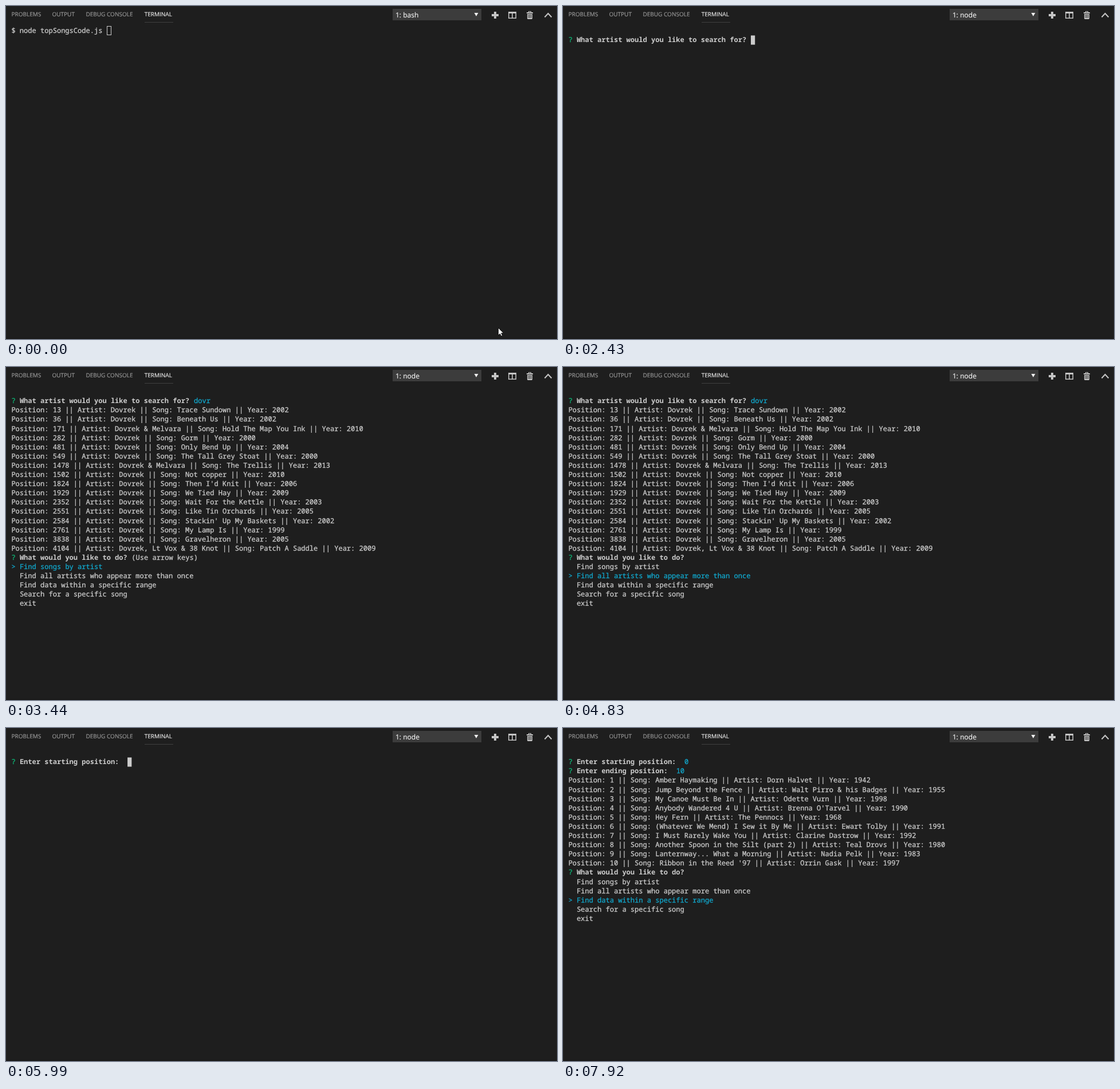
Write an HTML page that moves like this. It is 962x582 px and loops after 8 s.

```html
<!DOCTYPE html>
<html lang="en">
<head>
<meta charset="utf-8">
<title>Terminal</title>
<style>
  html, body { margin: 0; width: 100%; height: 100%; overflow: hidden; background: #1e1e1e; }
  svg { display: block; width: 962px; height: 582px; }
  text {
    text-rendering: geometricPrecision; white-space: pre;
    fill: currentColor; stroke: currentColor; stroke-width: .2px;
  }
  .ui { font-family: "Open Sans", "Noto Sans", sans-serif; }
  .tab { font-size: 10px; color: #979797; }
  .active { color: #e7e7e7; }
  .shell { font-size: 12px; color: #f0f0f0; }
  #screen { font: 12.067px "Noto Sans Mono", "DejaVu Sans Mono", monospace; color: #ccc; }
  #screen text { stroke-width: .3px; }
  #screen .bold { font-weight: 700; stroke: none; }
  #screen .cyan { color: #11a8cd; }
  #screen .green { color: #0dbc79; }
  .block { fill: #ccc; }
  .outline { fill: none; stroke: #ccc; }
</style>
</head>
<body>
<svg viewBox="0 0 962 582">
  <rect width="962" height="582" fill="#1e1e1e"/>
  <rect y="580" width="962" height="2" fill="#191919"/>

  <g class="ui tab">
    <text x="9.5" y="18">PROBLEMS</text>
    <text x="80.5" y="18">OUTPUT</text>
    <text x="139.5" y="18">DEBUG CONSOLE</text>
    <text x="241.7" y="18" class="active">TERMINAL</text>
  </g>
  <rect x="242" y="28" width="50" height="1" fill="#404040"/>

  <rect x="675" y="5" width="155" height="20" fill="#3c3c3c"/>
  <text id="shell" class="ui shell" x="680" y="20"></text>
  <path d="M817.5 12h7l-3.5 6z" fill="#f0f0f0"/>

  <g fill="#c5c5c5">
    <path d="M852 10h4v4h4v4h-4v4h-4v-4h-4v-4h4z"/>
    <path fill-rule="evenodd" d="M877 10h14v12h-14zM878.5 13v7.5h4.7v-7.5zM884.8 13v7.5h4.7v-7.5z"/>
    <path fill-rule="evenodd" d="M912 9h5v2h3v2h-11v-2h3zM913 10v1h3v-1zM910 14h9v8l-1 1h-7l-1-1zM911.5 15v6h1v-6zM914 15v6h1v-6zM916.5 15v6h1v-6z"/>
  </g>
  <path d="M940.5 19.5l6-6.5 6 6.5" fill="none" stroke="#c5c5c5" stroke-width="2"/>

  <g id="screen"></g>
  <path id="mouse" d="M859.5 562.5v13l3-2.700 2 4.2 2.2-1-2-4.2h4z" fill="#fff" stroke="#000" stroke-width=".8"/>
</svg>

<script>
const LOOP = 8000;
const CELL = { x: 9.4, y: 35.4, w: 7.24, h: 16.1, baseline: 11.7 };
const $ = id => document.getElementById(id);

// A row is a list of segments: [column, text, class]
const plain = text => [[0, text, '']];
const ask = (message, reply = '', style = '') =>
  [[0, '?', 'green'], [2, message, 'bold'], [message.length + 3, reply, style]];

const choices = ['Find songs by artist', 'Find all artists who appear more than once',
  'Find data within a specific range', 'Search for a specific song', 'exit'];

const menu = (selected, hint = '') => [
  ask('What would you like to do?', hint),
  ...choices.map((label, i) => i === selected
    ? [[0, '>', 'cyan'], [2, label, 'cyan']]
    : [[2, label, '']])
];
const freshMenu = menu(0, '(Use arrow keys)');

const star = 'Dovrek';
const byArtist = [
  [13, 'Trace Sundown', 2002],
  [36, 'Beneath Us', 2002],
  [171, 'Hold The Map You Ink', 2010, ' & Melvara'],
  [282, 'Gorm', 2000],
  [481, 'Only Bend Up', 2004],
  [549, 'The Tall Grey Stoat', 2000],
  [1478, 'The Trellis', 2013, ' & Melvara'],
  [1502, 'Not copper', 2010],
  [1824, "Then I'd Knit", 2006],
  [1929, 'We Tied Hay', 2009],
  [2352, 'Wait For the Kettle', 2003],
  [2551, 'Like Tin Orchards', 2005],
  [2584, "Stackin' Up My Baskets", 2002],
  [2761, 'My Lamp Is', 1999],
  [3838, 'Gravelheron', 2005],
  [4104, 'Patch A Saddle', 2009, ', Lt Vox & 38 Knot']
].map(([pos, song, year, guests = '']) =>
  plain(`Position: ${pos} || Artist: ${star}${guests} || Song: ${song} || Year: ${year}`));

const byRange = [
  ['Amber Haymaking', 'Dorn Halvet', 1942],
  ['Jump Beyond the Fence', 'Walt Pirro & his Badges', 1955],
  ['My Canoe Must Be In', 'Odette Vurn', 1998],
  ['Anybody Wandered 4 U', "Brenna O'Tarvel", 1990],
  ['Hey Fern', 'The Pennocs', 1968],
  ['(Whatever We Mend) I Sew it By Me', 'Ewart Tolby', 1991],
  ['I Must Rarely Wake You', 'Clarine Dastrow', 1992],
  ['Another Spoon in the Silt (part 2)', 'Teal Drovs', 1980],
  ['Lanternway... What a Morning', 'Nadia Pelk', 1983],
  ["Ribbon in the Reed '97", 'Orrin Gask', 1997]
].map(([song, artist, year], i) =>
  plain(`Position: ${i + 1} || Song: ${song} || Artist: ${artist} || Year: ${year}`));

const command = plain('$ node topSongsCode.js');
const query = star.slice(0, 4).toLowerCase();
const askArtist = (reply, style) => ask('What artist would you like to search for?', reply, style);
const askStart = (reply, style) => ask('Enter starting position: ', reply, style);
const askEnd = (reply, style) => ask('Enter ending position: ', reply, style);

const typingArtist = n => [[], askArtist(query.slice(0, n))];
const artistResults = list => [[], askArtist(query, 'cyan'), ...byArtist, ...list];
const typingEnd = reply => [[], askStart('0', 'cyan'), askEnd(reply)];
const rangeResults = list => [[], askStart('0', 'cyan'), askEnd('10', 'cyan'), ...byRange, ...list];

// [start in ms, rows, cursor as [column, row, style]]
const states = [
  [0, [command], [23, 0, 'outline']],
  [470, [command], [23, 0, 'block']],
  [1090, [command], [0, 1, 'block']],
  [1720, [command, ...freshMenu]],
  [2430, typingArtist(0), [44, 1, 'block']],
  [2970, typingArtist(2), [46, 1, 'block']],
  [3030, typingArtist(3), [47, 1, 'block']],
  [3200, typingArtist(4), [48, 1, 'block']],
  [3440, artistResults(freshMenu)],
  [4830, artistResults(menu(1))],
  [4910, artistResults(menu(2))],
  [5060, artistResults(menu(3))],
  [5840, artistResults(menu(2))],
  [5990, [[], askStart('')], [28, 1, 'block']],
  [6390, [[], askStart('0')], [29, 1, 'block']],
  [6530, typingEnd(''), [26, 2, 'block']],
  [6930, typingEnd('1'), [27, 2, 'block']],
  [7080, typingEnd('10'), [28, 2, 'block']],
  [7160, rangeResults(freshMenu)],
  [7770, rangeResults(menu(1))],
  [7920, rangeResults(menu(2))]
];

function make(tag, attributes, content = '') {
  const node = document.createElementNS('http://www.w3.org/2000/svg', tag);
  for (const key in attributes) node.setAttribute(key, attributes[key]);
  node.textContent = content;
  return node;
}

function drawCursor([col, row, style]) {
  const x = CELL.x + col * CELL.w, y = CELL.y + row * CELL.h;
  return style === 'outline'
    ? make('rect', { x: Math.round(x) + .5, y: Math.round(y) + .5, width: 7, height: 15, class: style })
    : make('rect', { x, y, width: CELL.w, height: CELL.h, class: style });
}

function draw([, rows, cursor]) {
  const nodes = rows.flatMap((row, r) => {
    const y = Math.round(CELL.y + r * CELL.h + CELL.baseline);
    return row.map(([col, text, style]) =>
      make('text', { x: CELL.x + col * CELL.w, y, class: style }, text));
  });
  if (cursor) nodes.push(drawCursor(cursor));
  $('screen').replaceChildren(...nodes);
}

const start = performance.now();
let shown;

function tick() {
  const t = (performance.now() - start) % LOOP;
  const state = states.findLast(([from]) => from <= t);
  if (state !== shown) draw(shown = state);
  $('shell').textContent = t < 1320 ? '1: bash' : '1: node';
  $('mouse').style.display = t < 70 ? '' : 'none';
  requestAnimationFrame(tick);
}
tick();
</script>
</body>
</html>
```
